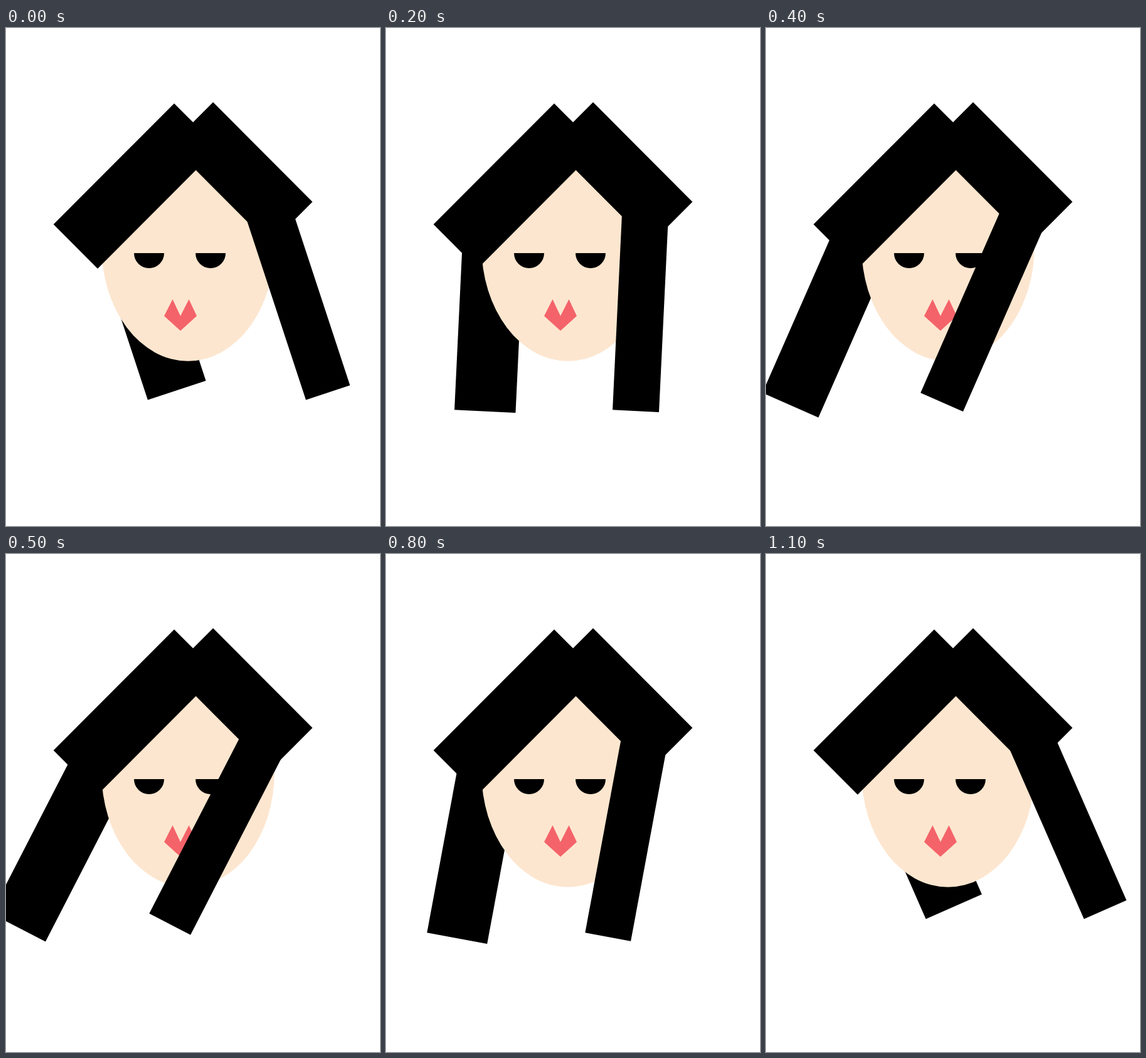
An HTML page with a canvas for the animation above (1600 ms loop, 596 px wide and 792 px high).

```html
<!DOCTYPE html>
<html lang="en">
<head>
<meta charset="utf-8">
<title>Swinging hair</title>
<style>
html, body { margin: 0; width: 100%; height: 100%; overflow: hidden; background: #fff; }
canvas { display: block; }
</style>
</head>
<body>
<canvas id="stage" width="596" height="792"></canvas>
<script>
const ctx = document.getElementById('stage').getContext('2d');
const HAIR = '#000', SKIN = '#fde6cf', LIPS = '#f4636a';
const LOOP = 1600, STEP = 100;

// Symmetric ease in and out over the span start..end.
function ease(t, start, end) {
  const s = Math.min(1, Math.max(0, (t - start) / (end - start)));
  const a = s ** 2.17, b = (1 - s) ** 2.17;
  return a / (a + b);
}

// Hair angle in degrees: already rising as the loop starts, then a faster fall and a rest.
function swing(t) {
  const top = 28;
  return t < 600
    ? -22.5 + (top + 22.5) * ease(t, -200, 600)
    : top - (top + 23.7) * ease(t, 597, 1077);
}

function poly(color, ...points) {
  ctx.fillStyle = color;
  ctx.beginPath();
  points.forEach(([x, y]) => ctx.lineTo(x, y));
  ctx.fill();
}

function oval(color, x, y, rx, ry, end) {
  ctx.fillStyle = color;
  ctx.beginPath();
  ctx.ellipse(x, y, rx, ry, 0, 0, end);
  ctx.fill();
}

// A bar with its top left corner at x, y, turned around that corner.
function bar(x, y, width, height, angle) {
  ctx.save();
  ctx.translate(x, y);
  ctx.rotate(angle * Math.PI / 180);
  ctx.fillStyle = HAIR;
  ctx.fillRect(0, 0, width, height);
  ctx.restore();
}

const lock = (x, width, angle) => bar(x, 284, width, 323.7, angle);

function draw(time) {
  const t = Math.floor((time % LOOP) / STEP) * STEP;
  const angle = swing(t);

  ctx.fillStyle = '#fff';
  ctx.fillRect(0, 0, 596, 792);

  lock(124.6, 97.5, angle);
  oval(SKIN, 290, 347.5, 137.8, 182.3, Math.PI * 2);
  for (const x of [228, 326]) oval(HAIR, x, 358, 24, 24, Math.PI);
  poly(LIPS, [265.5, 431.5], [278, 458], [291.5, 431.5], [304, 458], [278, 481.5], [252, 458]);
  lock(376.6, 74, angle);

  bar(268, 120, 99.5, 272, 45);
  bar(330, 118, 224, 95.8, 45);
}

let start;
function tick(now) {
  if (start === undefined) start = now;
  draw(now - start);
  requestAnimationFrame(tick);
}
draw(0);
requestAnimationFrame(tick);
</script>
</body>
</html>
```
